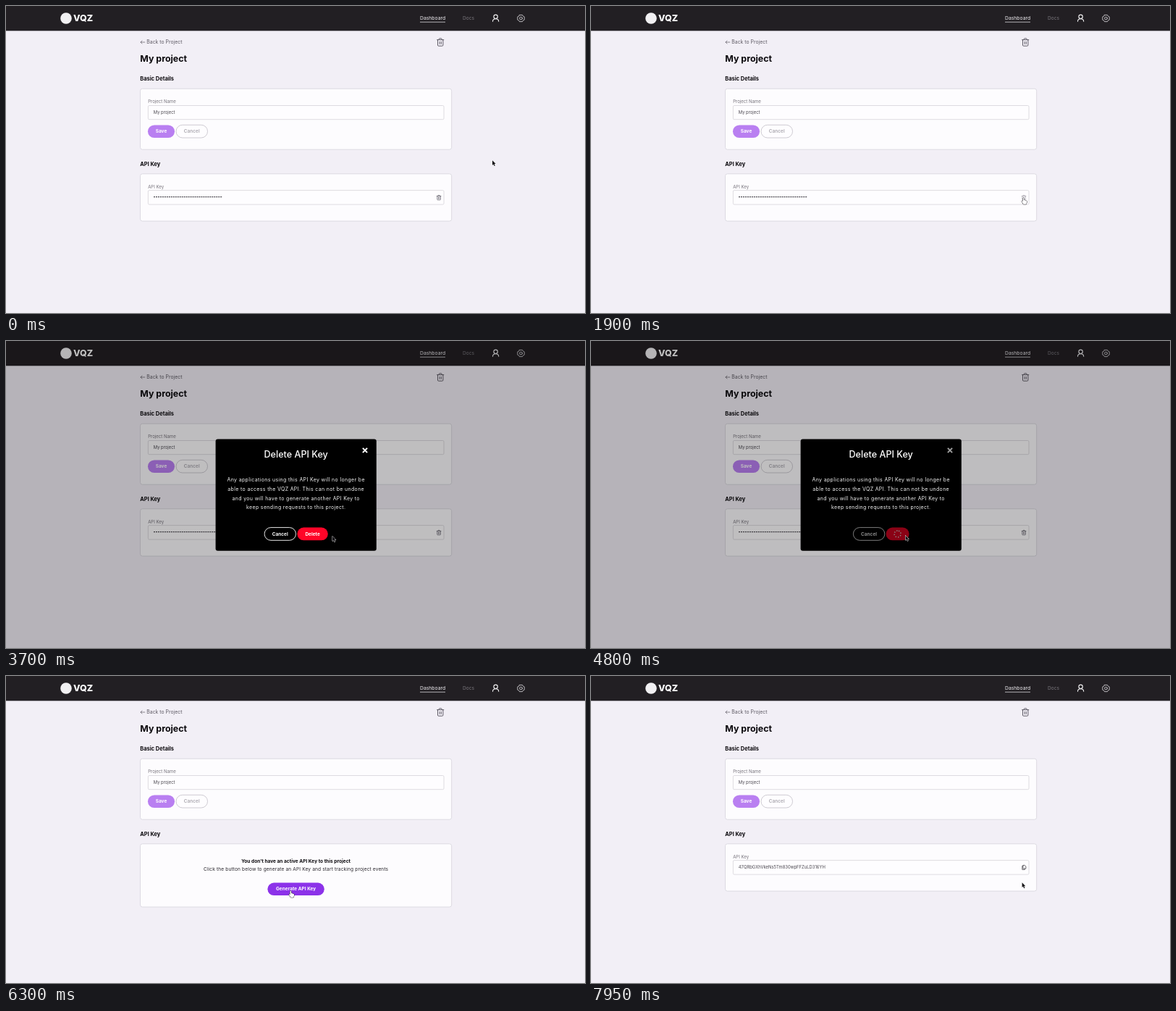
These frames come from a looping animation (800 by 424 pixels, 8 s). An HTML page:

```html
<!DOCTYPE html>
<html lang="en">
<head>
<meta charset="utf-8">
<title>API key settings</title>
<style>
  html, body { margin: 0; width: 100%; height: 100%; overflow: hidden; background: #f2eff6; }
  svg { display: block; width: 100%; height: 100%; }
  text { font-family: Inter, "Open Sans", sans-serif; font-size: 6.6px; fill: #0c0a0e; }
  .mid { text-anchor: middle; }
  .bold { font-weight: 700; }
  .btn { font-size: 6.5px; font-weight: 700; text-anchor: middle; fill: #fff; }
  .head { font-size: 7.45px; font-weight: 700; }
  .label { font-size: 6.05px; fill: #77737c; }
  .value { font-size: 5.9px; fill: #4b484f; }
  .card { fill: #fdfcfe; stroke: #dad7df; stroke-width: .9; }
  .field { fill: #fefdff; stroke: #d6d3da; stroke-width: .8; }
  .line { fill: none; stroke-linecap: round; stroke-linejoin: round; }
  .copy { font-size: 7px; letter-spacing: .34px; fill: #f4f4f4; text-anchor: middle; }
  .spin { fill: none; stroke: #fff; stroke-width: 1.5; stroke-dasharray: 1.35 2.1843; }
</style>
</head>
<body>
<svg viewBox="0 0 800 424" xmlns="http://www.w3.org/2000/svg">
  <defs>
    <g id="bin" class="line">
      <path d="M-4.6-3.3H4.6M-3.7-3.3V4Q-3.7 5.2-2.5 5.2H2.5Q3.7 5.2 3.7 4V-3.3M-1.9-3.4V-4.4Q-1.9-5.2-1.1-5.2H1.1Q1.9-5.2 1.9-4.4V-3.4M-1.1-.6V2.5M1.1-.6V2.5"/>
    </g>
  </defs>

  <rect width="800" height="424" fill="#f2eff6"/>
  <rect width="800" height="34.3" fill="#221f23"/>

  <!-- header -->
  <circle cx="83" cy="17" r="7.8" fill="#f1f0f2"/>
  <text x="93" y="21.2" style="font-size:12.4px;font-weight:800;fill:#fff">VQZ</text>
  <text x="572" y="19.2" style="font-size:6.8px;fill:#f2f0f4">Dashboard</text>
  <path d="M572 22.2H607" stroke="#d8d6da" stroke-width=".8"/>
  <text x="631" y="19.2" style="fill:#7b787e">Docs</text>
  <g class="line" stroke="#f4f3f5" stroke-width="1.1">
    <circle cx="676.6" cy="14.8" r="2.7"/>
    <path d="M672.5 21.3C672.6 16.5 680.6 16.5 680.7 21.3"/>
  </g>
  <g class="line" stroke="#c9c7cb" stroke-width=".9">
    <path d="M709.5 12.4H713.5L714.4 14 716.2 14.9V19.1L714.4 20 713.5 21.6H709.5L708.6 20 706.8 19.1V14.9L708.6 14Z"/>
    <circle cx="711.5" cy="17" r="1.9"/>
  </g>

  <!-- project details -->
  <path class="line" d="M191.8 50H186M188 48L186 50 188 52" stroke="#5d5963" stroke-width=".7"/>
  <text x="194.3" y="52.3" style="font-size:6.9px;fill:#5d5963">Back to Project</text>
  <use href="#bin" x="600.2" y="50" stroke="#615d68" stroke-width="1"/>
  <text x="185.3" y="77.2" class="bold" style="font-size:12.4px">My project</text>
  <text x="185.3" y="103.3" class="head">Basic Details</text>
  <rect class="card" x="185.5" y="114.2" width="430.2" height="84" rx="3"/>
  <text x="196.2" y="134.2" class="label">Project Name</text>
  <rect class="field" x="196.4" y="137.5" width="408.6" height="19.2" rx="1.5"/>
  <text x="203.8" y="149.1" class="value">My project</text>
  <rect x="196" y="164.4" width="37" height="17.6" rx="8.8" fill="#b97ff1"/>
  <text x="214.5" y="175.4" class="btn">Save</text>
  <rect x="235" y="164.3" width="43.5" height="17.7" rx="8.8" fill="#fefdff" stroke="#c9c6cd" stroke-width=".9"/>
  <text x="256.7" y="175.4" class="btn" style="font-weight:600;fill:#aaa7ae">Cancel</text>

  <!-- key card -->
  <text x="185.3" y="220.5" class="head">API Key</text>
  <rect class="card" id="card" x="185.5" y="231.8" width="430.2" height="65.3" rx="3"/>
  <g id="keyed">
    <text x="196.2" y="251.5" class="label">API Key</text>
    <rect class="field" x="196.4" y="254.6" width="408.6" height="19.5" rx="1.5"/>
    <g id="masked">
      <path d="M204 263.6H298.2" stroke="#4b484f" stroke-width="1.2" stroke-dasharray="2 .975"/>
      <g id="smallBin" transform="translate(598.1 264.6) scale(.62)" stroke="#615d68" stroke-width="1.2"><use href="#bin"/></g>
    </g>
    <g id="plain">
      <text x="203.8" y="266.3" class="value">47QRbGXhVkeNs5Tm830wpFFZuLD316YH</text>
      <path class="line" stroke="#4b484f" stroke-width=".8" d="M597.2 261.4H599.3L600.9 263V266H597.2ZM597.1 262.4H595.8V267.4H599.4V266.2"/>
    </g>
  </g>
  <g id="empty">
    <text x="400.6" y="258.3" class="mid bold">You don't have an active API Key to this project</text>
    <text x="400.6" y="268.8" class="mid" style="letter-spacing:.13px;fill:#29262c">Click the button below to generate an API Key and start tracking project events</text>
    <g id="make">
      <rect id="makeBox" y="285.6" height="17.5" rx="8.75" fill="#7000e5"/>
      <text id="makeText" x="400.6" y="296.4" class="btn">Generate API Key</text>
      <circle id="makeSpin" class="spin" r="4.5"/>
    </g>
  </g>

  <!-- dialog -->
  <g id="dialog">
    <rect width="800" height="424" opacity=".25"/>
    <rect x="289.6" y="135.4" width="222.2" height="154.3" rx="3"/>
    <text x="400.7" y="161" class="mid" style="font-size:12.6px;font-weight:500;fill:#fff">Delete API Key</text>
    <path id="close" d="M492.9 147.9L499.1 154.1M499.1 147.9L492.9 154.1" stroke="#fff" stroke-width="2"/>
    <text x="400.7" y="194.3" class="copy">Any applications using this API Key will no longer be</text>
    <text x="400.7" y="206.9" class="copy">able to access the VQZ API. This can not be undone</text>
    <text x="400.7" y="219.5" class="copy">and you will have to generate another API Key to</text>
    <text x="400.7" y="232.1" class="copy">keep sending requests to this project.</text>
    <g id="cancel">
      <rect x="357.1" y="257.6" width="43.4" height="17.7" rx="8.85" fill="none" stroke="#fff" stroke-width=".9"/>
      <text x="378.7" y="268.8" class="btn">Cancel</text>
    </g>
    <g id="drop">
      <rect id="dropBox" y="257.6" height="17.7" rx="8.85" fill="#ff0528"/>
      <text id="dropText" x="423.6" y="268.8" class="btn">Delete</text>
      <circle id="dropSpin" class="spin" r="4.5"/>
    </g>
  </g>

  <g id="cursor" stroke="#fff" stroke-width=".9" stroke-linejoin="round" paint-order="stroke">
    <path id="arrow" fill="#151317" d="M0 0V6.7L1.5 5.3 2.6 7.9 3.8 7.4 2.7 4.9H4.7Z"/>
    <path id="hand" fill="#fff" stroke="#232026" stroke-width="1"
      d="M-.9 .7A.85 .85 0 0 1 .8 .7V3.2C1.4 2.8 2.1 3 2.3 3.6 2.9 3.2 3.6 3.5 3.7 4.1 4.3 3.9 4.7 4.4 4.7 5 4.7 7 4 7.4 3.9 8.8H-.2C-.5 7.4-1.7 6.4-2.4 5.1-2.8 4.2-1.9 3.8-.9 4.9Z"/>
  </g>
</svg>
<script>
  const LOOP = 8000, STEP = 50;
  const OPEN = 2350, CONFIRM = 4450, REMOVED = 4850, REQUEST = 6750, READY = 7000;

  const smooth = u => u * u * (3 - 2 * u);
  const launch = u => Math.pow(u, 1.4);
  // start, end, x, y reached at the end, easing
  const moves = [
    [0, 750, 688, 211.3, smooth],
    [1250, 1900, 597.5, 265, smooth],
    [2300, 2350, 596.5, 266, smooth],
    [3000, 3850, 438, 270, smooth],
    [3850, 4050, 434.5, 268.5, smooth],
    [5450, 6300, 393.4, 297, smooth],
    [7700, 7950, 595.6, 285.3, launch]
  ];

  const el = {};
  document.querySelectorAll('[id]').forEach(n => el[n.id] = n);
  const show = (node, on) => node.style.display = on ? '' : 'none';
  const fade = (node, value) => node.setAttribute('opacity', value);

  function cursorAt(t) {
    let x = 672, y = 213.2;
    for (const [start, end, toX, toY, ease] of moves) {
      if (t <= start) break;
      const u = ease(Math.min(1, (t - start) / (end - start)));
      x += (toX - x) * u;
      y += (toY - y) * u;
    }
    return [x, y];
  }

  function button(name, mid, width, y, busy, hover, t) {
    const box = el[name + 'Box'], spin = el[name + 'Spin'];
    const w = busy ? 32 : width;
    box.setAttribute('x', mid - w / 2);
    box.setAttribute('width', w);
    show(el[name + 'Text'], !busy);
    show(spin, busy);
    spin.setAttribute('transform', `translate(${mid} ${y}) rotate(${t * .36 % 360})`);
    fade(el[name], busy ? .54 : hover ? .8 : 1);
  }

  function draw(t) {
    const [x, y] = cursorAt(t);
    const dialog = t >= OPEN && t < REMOVED;
    const empty = t >= REMOVED && t < READY;
    const deleting = dialog && t >= CONFIRM;
    const making = empty && t >= REQUEST;

    const onBin = t < OPEN && x < 601.5 && y > 260;
    const onDrop = dialog && !deleting && x < 444;
    const onMake = empty && !making && y > 285.6;
    const hand = onBin || onDrop || onMake;

    show(el.dialog, dialog);
    show(el.empty, empty);
    show(el.keyed, !empty);
    show(el.masked, t < REMOVED);
    show(el.plain, t >= READY);
    el.card.setAttribute('height', empty ? 87.2 : 65.3);
    fade(el.smallBin, onBin ? .5 : 1);

    fade(el.close, deleting ? .62 : 1);
    fade(el.cancel, deleting ? .54 : 1);
    el.cancel.setAttribute('transform', `translate(${deleting ? 5.3 : 0} 0)`);
    button('drop', 423.6, 42.4, 266.5, deleting, onDrop, t);
    button('make', 400.6, 78.4, 294.3, making, onMake, t);

    show(el.hand, hand);
    show(el.arrow, !hand);
    el.cursor.setAttribute('transform', `translate(${x} ${y})`);
  }

  function tick() {
    const t = performance.now() % LOOP;
    draw(Math.floor(t / STEP) * STEP);
    requestAnimationFrame(tick);
  }
  tick();
</script>
</body>
</html>
```
